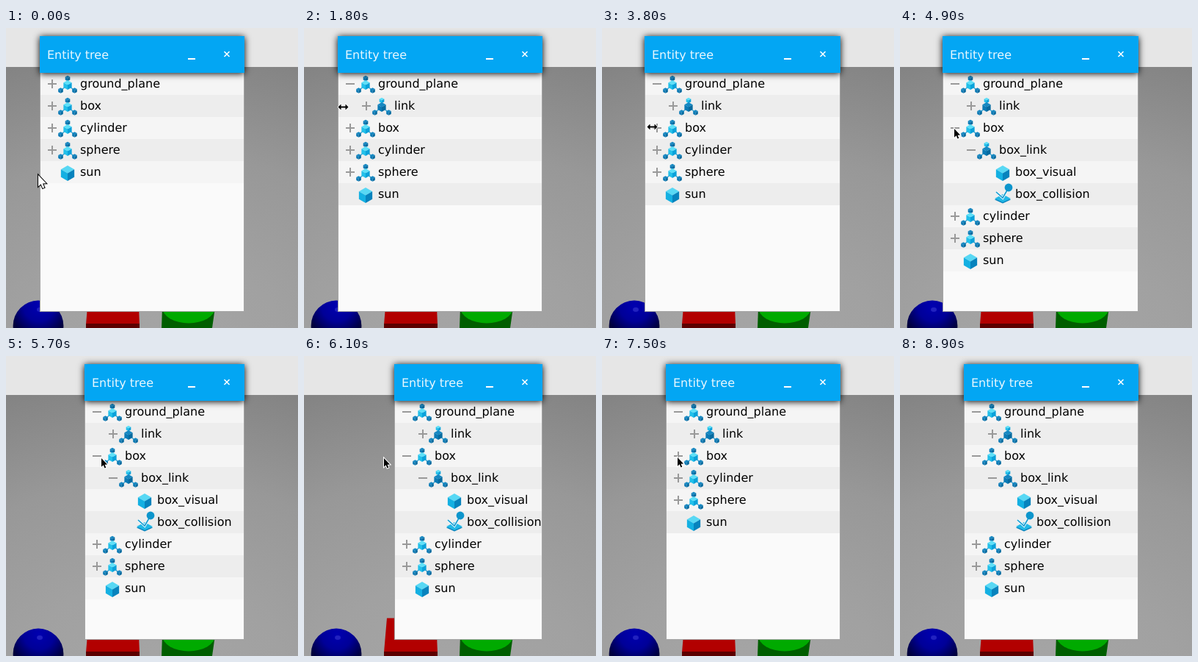
An HTML page with a canvas for the animation above (9100 ms loop, 398 by 408 pixels).

```html
<!DOCTYPE html>
<html lang="en">
<head>
<meta charset="utf-8">
<title>Entity tree</title>
<style>
html, body { margin: 0; width: 100%; height: 100%; overflow: hidden; background: #999; }
canvas { display: block; }
</style>
</head>
<body>
<canvas id="stage" width="398" height="408"></canvas>
<script>
const ctx = document.getElementById('stage').getContext('2d');
const LOOP = 9100, STEP = 100, RIGHT = 325, TOP = 61, ROW = 30;
const LIGHT = ['#5fe0f8', '#22c0ea', '#0aa2da'];
const DARK = ['#1688c2', '#0b7ab5', '#066a9f'];
const SOLID = ['#58d8f4', '#14b0e2', '#0783bd'];

// Each drag swings the panel's left edge out and lets it settle
const drags = [
  { start: 2100, time: 730, shift: 12, swing: 53 },
  { start: 5400, time: 1000, shift: 29, swing: 65 }
];

// Pointer moves: start, end, x, y
const moves = [
  [0, 500, 55, 139], [600, 900, 63, 77], [1600, 1800, 53, 107],
  [2100, 2700, 58, 89], [2700, 3100, 68, 134],
  [3700, 4400, 73, 136], [4900, 5200, 64, 138],
  [6400, 6600, 102, 137], [8000, 8200, 104, 170], [8200, 8800, 46, 7]
];

const progress = (t, start, time) => Math.min(1, Math.max(0, (t - start) / time));
const smooth = u => u * u * (3 - 2 * u);

function edge(t) {
  return drags.reduce((x, d) => {
    const u = progress(t, d.start, d.time);
    return x + d.shift * smooth(u) + d.swing * Math.sin(Math.PI * u) ** 2;
  }, 46);
}

function pointer(t) {
  let x = 43, y = 199;
  for (const [start, end, toX, toY] of moves) {
    const u = smooth(progress(t, start, end - start));
    x += (toX - x) * u;
    y += (toY - y) * u;
  }
  // A dragged edge trails the pointer by one step
  if (drags.some(d => t >= d.start && t <= d.start + 1000)) x = edge(t + STEP) + 2;
  return [Math.round(x), Math.round(y)];
}

function rect(color, x, y, w, h) {
  ctx.fillStyle = color;
  ctx.fillRect(x, y, w, h);
}

function poly(points, fill, stroke, width = 1) {
  ctx.beginPath();
  points.forEach(p => ctx.lineTo(...p));
  ctx.closePath();
  if (stroke) {
    ctx.strokeStyle = stroke;
    ctx.lineWidth = width;
    ctx.stroke();
  }
  ctx.fillStyle = fill;
  ctx.fill();
}

function ellipse(fill, x, y, rx, ry = rx) {
  ctx.beginPath();
  ctx.ellipse(x, y, rx, ry, 0, 0, 7);
  ctx.fillStyle = fill;
  ctx.fill();
}

function line(color, width, ...points) {
  ctx.beginPath();
  points.forEach(p => ctx.lineTo(...p));
  ctx.strokeStyle = color;
  ctx.lineWidth = width;
  ctx.stroke();
}

function radial(x, y, r, ...stops) {
  const g = ctx.createRadialGradient(x, y, 0, x, y, r);
  stops.forEach((c, i) => g.addColorStop(i / (stops.length - 1), c));
  return g;
}

function clipped(x, y, w, h, paint) {
  ctx.save();
  ctx.beginPath();
  ctx.rect(x, y, w, h);
  ctx.clip();
  paint();
  ctx.restore();
}

function scene() {
  rect('#e6e6e6', 0, 0, 398, 53);
  clipped(0, 53, 398, 355, () => {
    ctx.translate(200, 440);
    ctx.scale(1.35, 1);
    rect(radial(0, 0, 410, '#a5a5a5', '#a1a1a1', '#989898', '#848484'), -200, -390, 400, 400);
  });

  ellipse(radial(45, 378, 42, '#0000b0', '#000098', '#00003c'), 44, 405, 34.4);
  ellipse('#2222c0', 46, 383, 4, 3);

  poly([[113, 356.5], [180, 356.5], [182, 403], [109, 403]], '#b20000');
  rect('#5c0000', 109, 402, 73, 6);

  poly([[213, 380], [285, 380], [281, 408], [212, 408]], '#005e00');
  ellipse('#00aa00', 249, 380, 36, 21.5);
}

function cube(x, y, r, [top, left, right]) {
  const w = r * 0.87, h = r / 2;
  poly([[x, y - r], [x + w, y - h], [x, y], [x - w, y - h]], top);
  poly([[x - w, y - h], [x, y], [x, y + r], [x - w, y + h]], left);
  poly([[x + w, y - h], [x, y], [x, y + r], [x + w, y + h]], right);
}

function assembly(x, y, core, head) {
  const hub = [x, y + 1.5];
  [[x, y - 7.5], [x - 9.5, y + 9], [x + 9.5, y + 9]].forEach((p, i) => {
    line('#2a9ed0', 1.2, hub, p);
    cube(...p, 3.8, i ? DARK : head);
  });
  cube(...hub, 6.5, core);
}

// Icons are centred on (x, y)
const icons = {
  model: (x, y) => assembly(x, y, LIGHT, DARK),
  link: (x, y) => assembly(x, y, DARK, LIGHT),
  solid: (x, y) => cube(x, y + 1.5, 10.5, SOLID),
  collision(x, y) {
    const plate = dy => [[x - 11, y + 6 + dy], [x, y + dy], [x + 11, y + 6 + dy], [x, y + 11 + dy]];
    poly(plate(1.5), '#0783bd');
    poly(plate(0), '#22b8e6');
    line('#e8f8fd', 3.5, [x - 9, y - 3], [x, y + 5], [x + 7, y - 7]);
    line('#1299cf', 1.6, [x - 9, y - 3], [x, y + 5], [x + 7, y - 7]);
    ellipse('#0d95cc', x + 8, y - 9, 5.4);
  }
};

// Rows are [label, icon, depth, toggle], toggle being '+', '-' or nothing
function treeRows(planeOpen, boxOpen) {
  return [
    ['ground_plane', 'model', 0, planeOpen ? '-' : '+'],
    ...(planeOpen ? [['link', 'link', 1, '+']] : []),
    ['box', 'model', 0, boxOpen ? '-' : '+'],
    ...(boxOpen ? [
      ['box_link', 'link', 1, '-'],
      ['box_visual', 'solid', 2],
      ['box_collision', 'collision', 2]
    ] : []),
    ['cylinder', 'model', 0, '+'],
    ['sphere', 'model', 0, '+'],
    ['sun', 'solid', 0]
  ];
}

function text(color, label, x, y) {
  ctx.font = '16px "DejaVu Sans", sans-serif';
  ctx.textRendering = 'geometricPrecision';
  ctx.fillStyle = color;
  ctx.fillText(label, x, y);
}

function treeRow([label, icon, depth, toggle], i, left) {
  const x = left + depth * 22, y = TOP + i * ROW;
  rect(i % 2 ? '#ededed' : '#f5f5f5', left + 1, y, RIGHT - left - 2, ROW);
  if (toggle) rect('#999', x + 11, y + 14, 12, 2);
  if (toggle === '+') rect('#999', x + 16, y + 9, 2, 12);
  icons[icon](x + 38, y + 15);
  text('#000', label, x + 55, y + 20);
}

function header(left) {
  ctx.save();
  ctx.shadowColor = '#000';
  ctx.shadowBlur = 9;
  ctx.shadowOffsetY = 1;
  rect('#03a6f3', left, 11, RIGHT - left, 50);
  ctx.restore();
  text('#e9f7fe', 'Entity tree', left + 10, 42);
  rect('#fff', 248, 41, 10, 2);
  line('#fff', 1.6, [297.5, 32], [304.5, 39]);
  line('#fff', 1.6, [304.5, 32], [297.5, 39]);
}

function panel(left, rows) {
  const width = RIGHT - left;
  rect('#a6a6a6', left, TOP, width, 325);
  rect('#fafafa', left + 1, TOP, width - 2, 324);
  clipped(left + 1, TOP, width - 2, 324, () => rows.forEach((row, i) => treeRow(row, i, left)));
  header(left);
}

function arrow(x, y, size, fill, outline) {
  const shape = [[0, 0], [0, 13], [3, 10.3], [5, 15], [7, 14.2], [5, 9.6], [9, 9.4]];
  poly(shape.map(([a, b]) => [x + 1 + a * size, y + 1 + b * size]), fill, outline, 2);
}

function resizer(x, y) {
  const half = [[-3, -4], [-3, -1], [3, -1], [3, -4], [7, 0]];
  const shape = [...half, ...half.map(([a, b]) => [-a, -b])];
  poly(shape.map(([a, b]) => [x + 0.5 + a, y + 0.5 + b]), '#000', '#fff', 1.5);
}

function draw(t) {
  const left = Math.round(edge(t)), [x, y] = pointer(t);
  const boxOpen = t >= 4800 && t < 7100 || t >= 7600;
  scene();
  panel(left, treeRows(t >= 1200, boxOpen));
  if (t >= 8900) return;
  if (t < STEP) arrow(x, y, 1.2, '#fff', '#000');
  else if (Math.abs(x - left) < 12) resizer(x, y);
  else arrow(x, y, 0.9, '#000', '#fff');
}

const start = performance.now();
function tick() {
  const t = (performance.now() - start) % LOOP;
  draw(Math.floor(t / STEP) * STEP);
  requestAnimationFrame(tick);
}
tick();
</script>
</body>
</html>
```
